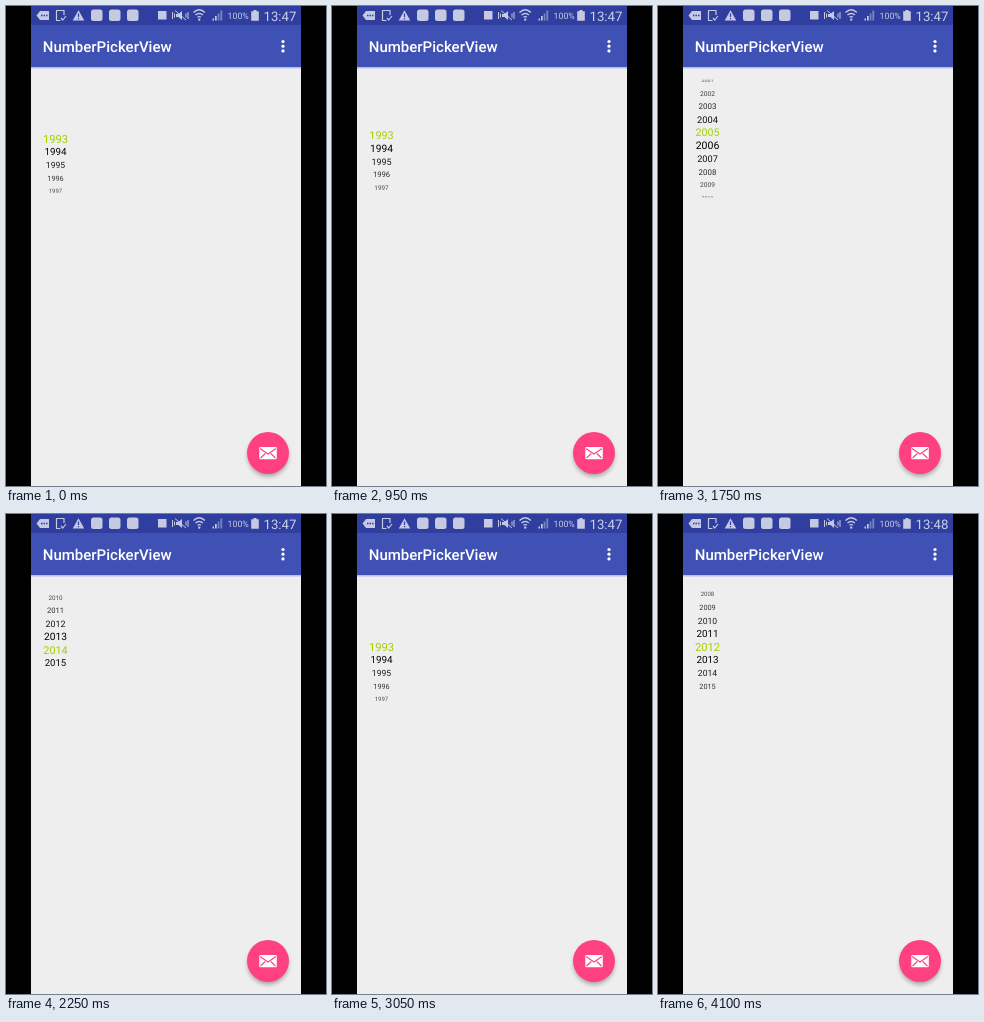
An HTML page for the animation above (4.25 s loop, 320 by 480 pixels).

```html
<!DOCTYPE html>
<html lang="en">
<head>
<meta charset="utf-8">
<title>NumberPickerView</title>
<style>
  html, body { margin: 0; width: 100%; height: 100%; overflow: hidden; background: #000; }
  svg { display: block; width: 100vw; height: 100vh; font-family: Roboto, sans-serif; text-rendering: geometricPrecision; }
  #picker text { text-anchor: middle; }
</style>
</head>
<body>
<svg viewBox="0 0 320 480">
  <defs>
    <clipPath id="window"><rect x="25" y="73.6" width="60" height="118"/></clipPath>
    <linearGradient id="barShadow" x2="0" y2="1">
      <stop stop-color="#a9b4e6"/><stop offset="1" stop-color="#eee"/>
    </linearGradient>
    <filter id="soft" x="-30%" y="-30%" width="160%" height="160%"><feGaussianBlur stdDeviation="2.2"/></filter>
  </defs>

  <rect width="320" height="480"/>
  <rect x="25" width="270" height="480" fill="#eee"/>
  <rect x="25" y="61" width="270" height="2.5" fill="url(#barShadow)"/>
  <rect x="25" width="270" height="61" fill="#3f51b5"/>
  <rect x="25" width="270" height="19" fill="#303f9f"/>

  <g id="status" fill="#c5c9e2" stroke-linejoin="round">
    <path d="M30.5 9.5 34 5h9v9h-9z"/>
    <path d="M35 9.5h1.5m1 0h1.5m1 0h1.5" stroke="#303f9f" stroke-width="1.5"/>
    <path d="M58 9V4.5h-7.5v10h4M55 12l1.8 2 3.2-4" fill="none" stroke="#c5c9e2" stroke-width="1.2"/>
    <path d="M72.5 4.2 78.3 14.5H66.7z"/>
    <path d="M72.5 7.5v3.5m0 1v1.3" stroke="#303f9f" stroke-width="1.2"/>
    <rect x="85" y="3.5" width="11.5" height="11.5" rx="2.5"/>
    <rect x="103" y="3.5" width="11.5" height="11.5" rx="2.5"/>
    <rect x="121" y="3.5" width="11.5" height="11.5" rx="2.5"/>
    <rect x="152" y="5" width="8.5" height="8.5"/>
    <path d="M170 8h2.5l3.5-3v9l-3.5-3H170z"/>
    <path d="M169 4.5 180 14M166.500 6v7m2-5.500v4M182 6v7m-2-5.500v4" fill="none" stroke="#c5c9e2"/>
    <path d="M187.500 6.500q5.700-5.500 11.400 0M189.500 9q3.700-3.200 7.400 0M191.500 11.300q1.700-1.400 3.400 0" fill="none" stroke="#c5c9e2" stroke-width="1.400"/>
    <circle cx="193.200" cy="13.600" r="1.200"/>
    <path d="M206.500 14.500v-2h1.500v2zm2.500 0V10h1.700v4.500z"/>
    <path d="M211.700 14.500V7.500h1.700v7zm2.700 0V4.500h1.800v10z" opacity=".5"/>
    <text x="221.500" y="13" font-size="8.800">100%</text>
    <path d="M247.500 4h3v1.300h2.300v9.400h-7.600V5.300h2.300z"/>
    <text id="clock" x="257.500" y="14.500" font-size="13.200" fill="#cdd1e8">13:47</text>
  </g>

  <text x="36.8" y="45.500" font-size="15" font-weight="500" fill="#fff">NumberPickerView</text>
  <g fill="#fff">
    <circle cx="277" cy="35.500" r="1.600"/>
    <circle cx="277" cy="40.200" r="1.600"/>
    <circle cx="277" cy="44.900" r="1.600"/>
  </g>

  <g id="picker" clip-path="url(#window)"></g>

  <circle cx="262" cy="450" r="20.500" opacity=".3" filter="url(#soft)"/>
  <circle cx="262" cy="447" r="21" fill="#ff4081"/>
  <rect x="253.300" y="441" width="17.500" height="12.300" rx="1.200" fill="#fff"/>
  <path d="m254 442.500 8 5.500 8-5.500M254.500 452l4.800-4.500M269.500 452l-4.800-4.500" fill="none" stroke="#ff4081" stroke-width="1.100"/>
</svg>

<script>
const LOOP = 4250, STEP = 50;
const FIRST = 1993, COUNT = 23;
const CENTER_X = 49.5, CENTER_Y = 132.8, ROW = 13.13;

const linear = u => u;
const smooth = u => u * u * (3 - 2 * u);
const easeOut = u => 1 - (1 - u) ** 2;

// Scroll position in rows: time, row, easing used to reach it
const scroll = [
  [0, 0], [850, 0, linear], [950, 0.28, linear],
  [1750, 12.47, linear], [2250, 20.76, linear], [2400, 22, easeOut],
  [2550, 22, linear], [2950, 0, smooth], [3150, 0, linear],
  [3500, 3, smooth], [3600, 3, linear], [3950, 19, smooth], [LOOP, 19, linear]
];

function rowAt(time) {
  const i = scroll.findIndex(key => key[0] > time);
  const [t0, r0] = scroll[i - 1], [t1, r1, ease] = scroll[i];
  return r0 + (r1 - r0) * ease((time - t0) / (t1 - t0));
}

const picker = document.getElementById('picker');
const clock = document.getElementById('clock');
const years = Array.from({ length: COUNT }, (_, i) => {
  const label = document.createElementNS('http://www.w3.org/2000/svg', 'text');
  label.textContent = FIRST + i;
  label.setAttribute('x', CENTER_X);
  return picker.appendChild(label);
});

function draw(time) {
  const row = rowAt(time);
  years.forEach((label, i) => {
    const distance = Math.abs(i - row);
    label.style.display = distance < 5 ? '' : 'none';
    if (distance >= 5) return;
    const size = 11.2 - 1.3 * distance;
    const selected = distance < 0.5;
    label.setAttribute('font-size', size);
    label.setAttribute('y', CENTER_Y + (i - row) * ROW + size * 0.355);
    label.setAttribute('fill', selected ? '#a2d000' : '#000');
    label.setAttribute('opacity', selected ? 1 : 1.08 - 0.1 * distance);
  });
  clock.textContent = time < 4100 ? '13:47' : '13:48';
}

const start = performance.now();
function tick() {
  const time = (performance.now() - start) % LOOP;
  draw(Math.floor(time / STEP) * STEP);
  requestAnimationFrame(tick);
}
tick();
</script>
</body>
</html>
```
